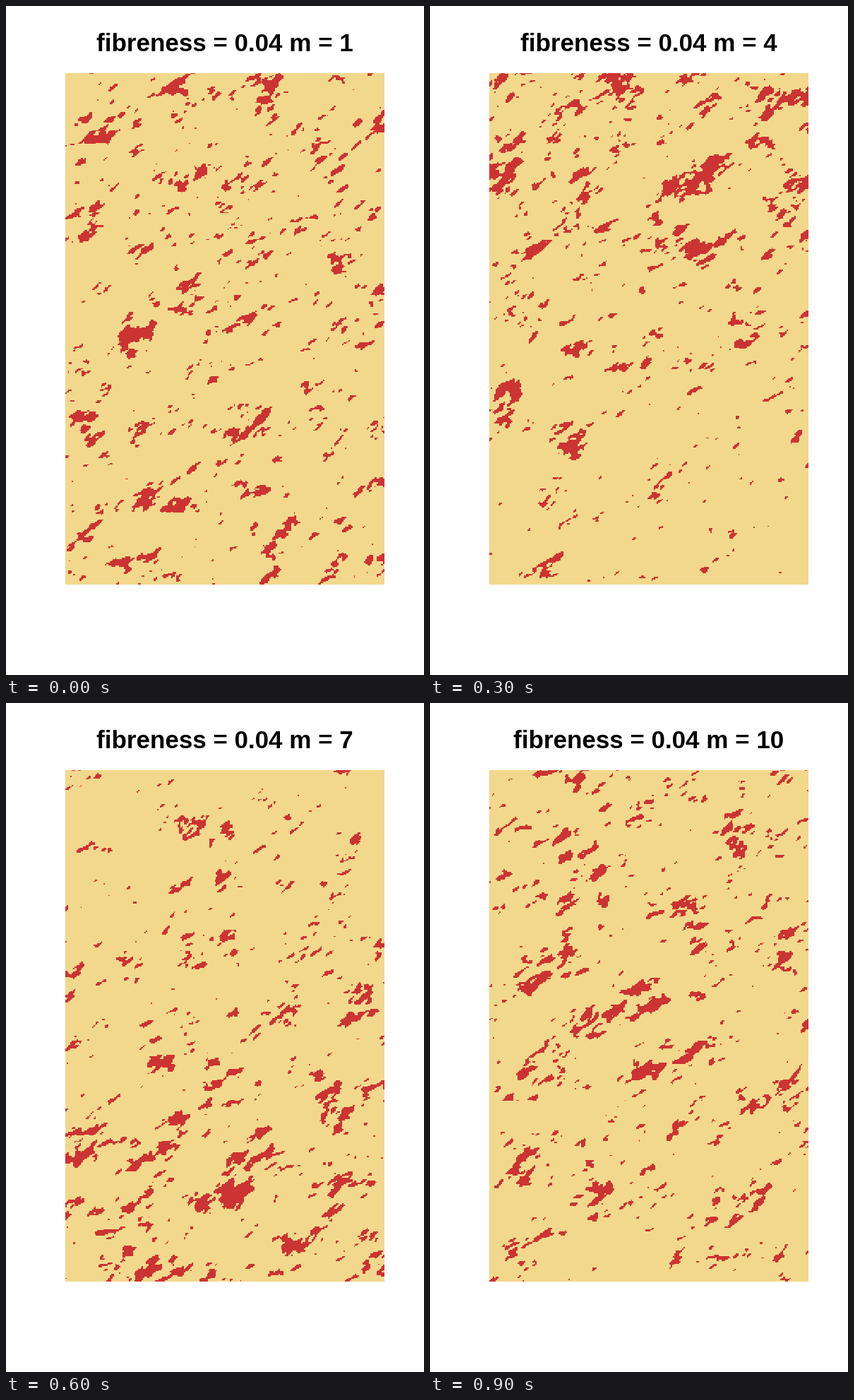
Animation, 592 px wide and 947 px high, one loop 1000 ms. Source, as a matplotlib script:

```python
import numpy as np
import matplotlib.pyplot as plt
from matplotlib.animation import FuncAnimation
from matplotlib.colors import ListedColormap

WIDTH, HEIGHT, DPI = 592, 947, 100
LEFT, TOP, RIGHT, BOTTOM = 84, 95, 536, 819
COLS, ROWS, PAD = 250, 400, 512
STEPS = 10
ANGLE = np.radians(33)
DENSITY = 0.083
COLOURS = ListedColormap([(0.95, 0.85, 0.55), (0.8, 0.2, 0.2)])


def band_noise(rng, wavelength, stretch):
    """Unit-variance noise around one wavelength, elongated along the fibres."""
    freq = np.fft.fftfreq(PAD)
    fx, fy = freq[None, :], freq[:, None]
    along = fx * np.cos(ANGLE) - fy * np.sin(ANGLE)
    across = fx * np.sin(ANGLE) + fy * np.cos(ANGLE)
    radius = np.hypot(along * stretch, across / stretch) * wavelength
    spectrum = np.fft.fft2(rng.standard_normal((PAD, PAD)))
    noise = np.fft.ifft2(spectrum * np.exp(-((radius - 1) / 0.45) ** 2 / 2)).real
    return (noise / noise.std())[:ROWS, :COLS]


def pattern(m):
    """Threshold layered noise so that a fixed share of the cells is filled."""
    rng = np.random.default_rng(400 + m)
    field = sum(0.75 ** i * band_noise(rng, 26 / 2 ** i, 1.45) for i in range(3))
    field += 0.9 * band_noise(rng, 70, 1.2)
    field /= field.std()

    # The denser end drifts between top and bottom over the series.
    lean = 0.15 + np.sin(2 * np.pi * (m - 1) / 9)
    field += lean * np.linspace(0.5, -0.5, ROWS)[:, None]
    return field > np.quantile(field, 1 - DENSITY)


fig = plt.figure(figsize=(WIDTH / DPI, HEIGHT / DPI), dpi=DPI, facecolor="white")
ax = fig.add_axes([LEFT / WIDTH, 1 - BOTTOM / HEIGHT,
                   (RIGHT - LEFT) / WIDTH, (BOTTOM - TOP) / HEIGHT])
ax.axis("off")
image = ax.imshow(np.zeros((ROWS, COLS)), cmap=COLOURS, vmin=0, vmax=1,
                  interpolation="nearest", aspect="auto")
title = fig.text((LEFT + RIGHT) / 2 / WIDTH, 1 - 64 / HEIGHT, "",
                 ha="center", va="baseline", family="Liberation Sans",
                 weight="bold", size=35 * 72 / DPI, color="black")


def draw(step):
    m = step + 1
    image.set_data(pattern(m).astype(float))
    title.set_text(f"fibreness = 0.04 m = {m}")
    return image, title


animation = FuncAnimation(fig, draw, frames=STEPS, interval=100,
                          repeat=True, repeat_delay=0)
plt.show()
```
